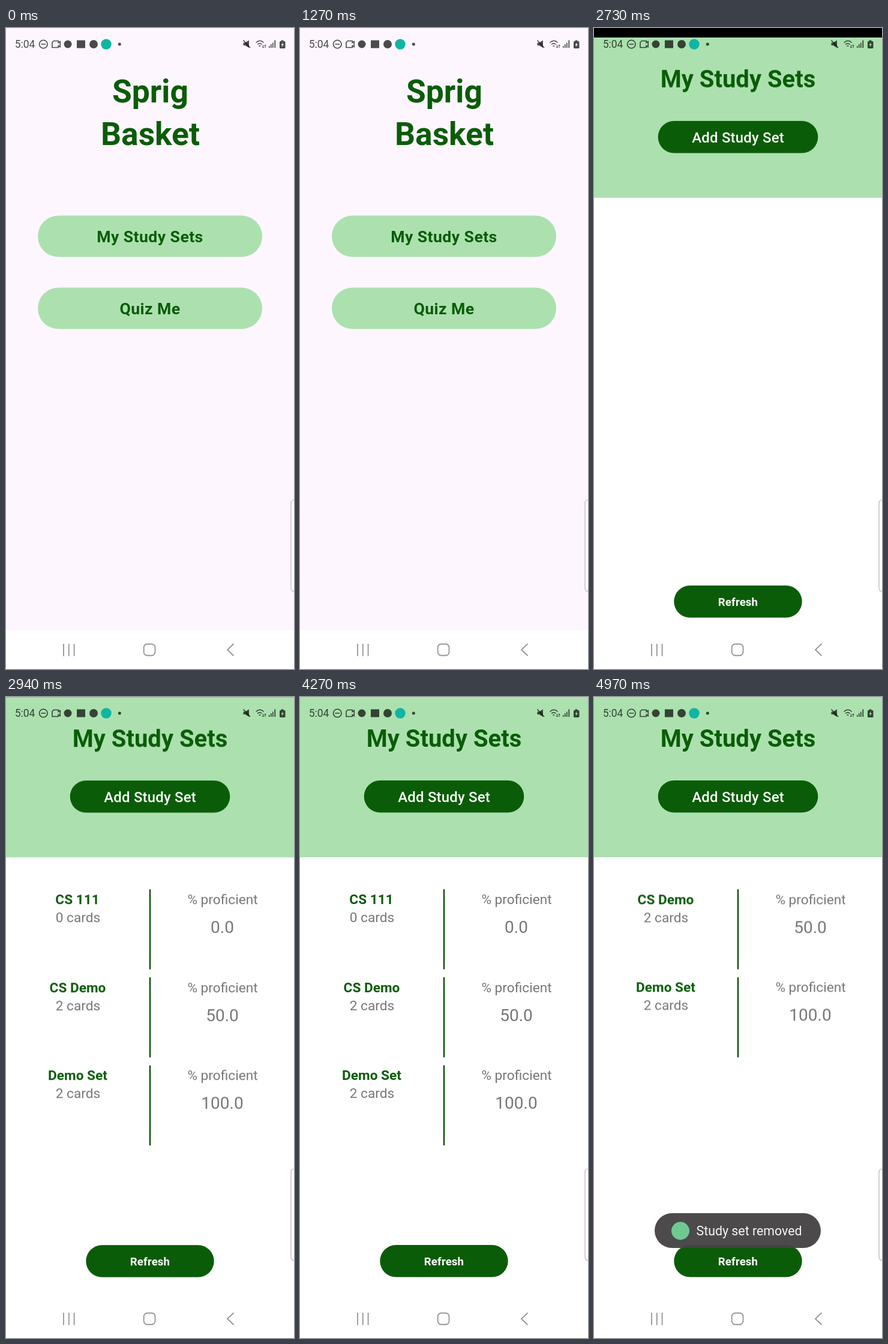
An HTML page for the animation above (5 s loop, 480x1068 px).

```html
<!DOCTYPE html>
<html lang="en">
<head>
<meta charset="utf-8">
<title>Study sets</title>
<style>
  html, body { margin: 0; width: 100%; height: 100%; overflow: hidden; background: #fff; }
  svg { display: block; width: 100%; height: 100%; }
  text { font-family: Roboto, sans-serif; text-anchor: middle; }
  .dark { fill: #0b5c08; }
  .light { fill: #ace1af; }
  .bold { font-weight: 700; }
  .name { font-size: 53.33px; }
  .choice { font-size: 26.67px; letter-spacing: .4px; }
  .heading { font-size: 40px; }
  .add { font-size: 24px; font-weight: 500; letter-spacing: .17px; fill: #fff; }
  .refresh { font-size: 18.67px; letter-spacing: .13px; fill: #fff; }
  .row { font-size: 22.67px; }
  .grey, .score { fill: #777; }
  .score { font-size: 28px; }
  .toast text { font-size: 21.33px; fill: #f6f6f6; }

  .home { animation: home 5s infinite step-end; }
  .sets { animation: rise 5s infinite, appear 5s infinite linear; }
  .list { animation: list 5s infinite step-end; }
  .removed { animation: removed 5s infinite step-end; }
  .rest { animation: close-gap 5s infinite step-end; }
  .toast { animation: toast 5s infinite linear; }

  @keyframes home { 0% { opacity: 1; } 53%, 100% { opacity: 0; } }
  @keyframes appear { 0%, 51% { opacity: 0; } 53%, 100% { opacity: 1; } }
  @keyframes rise {
    0%, 51% { transform: translateY(47px); animation-timing-function: cubic-bezier(.4, 0, .2, 1); }
    59.5%, 100% { transform: none; }
  }
  @keyframes list { 0% { opacity: 0; } 57.2%, 100% { opacity: 1; } }
  @keyframes removed { 0% { opacity: 1; } 87.8%, 100% { opacity: 0; } }
  @keyframes close-gap { 0% { transform: none; } 87.8%, 100% { transform: translateY(-146.67px); } }
  @keyframes toast { 0%, 88.8% { opacity: 0; } 93.6%, 100% { opacity: 1; } }
</style>
</head>
<body>
<svg viewBox="0 0 480 1068">
  <defs>
    <g id="row-base">
      <rect class="dark" x="238.7" y="320.3" width="2.6" height="133.4"/>
      <text class="grey" x="361" y="345">% proficient</text>
    </g>
  </defs>

  <rect width="480" height="1068"/>

  <g class="home">
    <rect width="480" height="1068" fill="#fdf6fe"/>
    <g class="dark bold">
      <text class="name" x="240.5" y="123.5">Sprig</text>
      <text class="name" x="240.5" y="194.5">Basket</text>
    </g>
    <rect class="light" x="53" y="312.5" width="374" height="69" rx="34.5"/>
    <rect class="light" x="53" y="432.5" width="374" height="69" rx="34.5"/>
    <g class="dark bold choice">
      <text x="240" y="357.3">My Study Sets</text>
      <text x="240" y="477.3">Quiz Me</text>
    </g>
  </g>

  <g class="sets">
    <rect width="480" height="1068" fill="#fff"/>
    <rect class="light" width="480" height="267"/>
    <text class="dark bold heading" x="240" y="83.3">My Study Sets</text>
    <rect class="dark" x="106.7" y="139" width="266.6" height="53.5" rx="26.7"/>
    <text class="add" x="240" y="175.3">Add Study Set</text>
    <g class="list">
      <g class="row removed">
        <use href="#row-base"/>
        <text class="dark bold" x="119" y="345">CS 111</text>
        <text class="grey" x="120" y="375">0 cards</text>
        <text class="score" x="360.5" y="393">0.0</text>
      </g>
      <g class="rest">
        <g class="row" transform="translate(0 146.67)">
          <use href="#row-base"/>
          <text class="dark bold" x="119.5" y="345">CS Demo</text>
          <text class="grey" x="120" y="375">2 cards</text>
          <text class="score" x="360.5" y="393">50.0</text>
        </g>
        <g class="row" transform="translate(0 293.33)">
          <use href="#row-base"/>
          <text class="dark bold" x="119.5" y="345">Demo Set</text>
          <text class="grey" x="120" y="375">2 cards</text>
          <text class="score" x="360.5" y="393">100.0</text>
        </g>
      </g>
    </g>
    <rect class="dark" x="133.3" y="913" width="213.4" height="53.5" rx="26.7"/>
    <text class="bold refresh" x="240" y="946.7">Refresh</text>
  </g>

  <g class="toast">
    <rect x="101" y="860" width="277" height="58" rx="29" fill="#464345" fill-opacity=".96"/>
    <circle cx="144" cy="889.5" r="15" fill="#70c992"/>
    <text x="258.5" y="897">Study set removed</text>
  </g>

  <!-- Status bar -->
  <g fill="#000" fill-opacity=".7">
    <text x="31.5" y="33.2" font-size="17.5">5:04</text>
    <circle cx="103" cy="27" r="6.5"/>
    <rect x="118" y="20.5" width="14" height="13"/>
    <circle cx="146" cy="27" r="7"/>
    <circle cx="189.3" cy="27" r="2.5"/>
    <path d="M395.5 24.5h3l6.5-4v12.5l-6.5-4h-3z"/>
    <path d="M438 30h1.6v3H438zM441 27h1.6v6H441zM444 24.5h1.6V33H444zM447.4 20.5h1.8V33h-1.8z"/>
    <path fill-rule="evenodd" d="M458.5 20.5h4V22h1.5q1.5 0 1.5 1.5v9q0 1.5-1.5 1.5h-6.5q-1.5 0-1.5-1.5v-9q0-1.5 1.5-1.5h1zM461.5 24l-3 4.5h2L459.5 32l3.5-5h-2z"/>
  </g>
  <g fill="none" stroke="#000" stroke-opacity=".7" stroke-width="1.6">
    <circle cx="62.3" cy="27" r="6.8"/>
    <path d="M58.5 27h7.6M79.5 21.5h7.7v3l3-2v9l-3-2v3H77V24z"/>
    <path d="M395.5 20.5l11.5 12.5"/>
    <path d="M416.5 24.5q7-6.5 13 0M419 27.5q4-3.5 7.5 0M421.5 30.5q1.5-1.3 2.8 0" stroke-width="1.4"/>
    <path d="M428.5 28v5m-1.5-1.5l1.5 1.5 1.5-1.5M432 33v-5m-1.5 1.5l1.5-1.5 1.5 1.5" stroke-width="1"/>
  </g>
  <circle cx="167" cy="27" r="8.7" fill="#10b5a4"/>

  <!-- Edge handle and navigation bar -->
  <path d="M481 786.5h-1.5q-4.5 0-4.5 6v140q0 6 4.5 6h1.5" fill="#fff" fill-opacity=".8" stroke="#b9b0bb" stroke-width="1.2"/>
  <rect y="1003.5" width="480" height="64.5" fill="#fff"/>
  <g fill="none" stroke="#959396" stroke-width="1.8">
    <path d="M96 1026v20.5M104.8 1026v20.5M113.6 1026v20.5"/>
    <rect x="229.7" y="1026.5" width="18.8" height="19" rx="5.5"/>
    <path d="M379.5 1026l-10.5 10 10.5 10"/>
  </g>
</svg>
</body>
</html>
```
